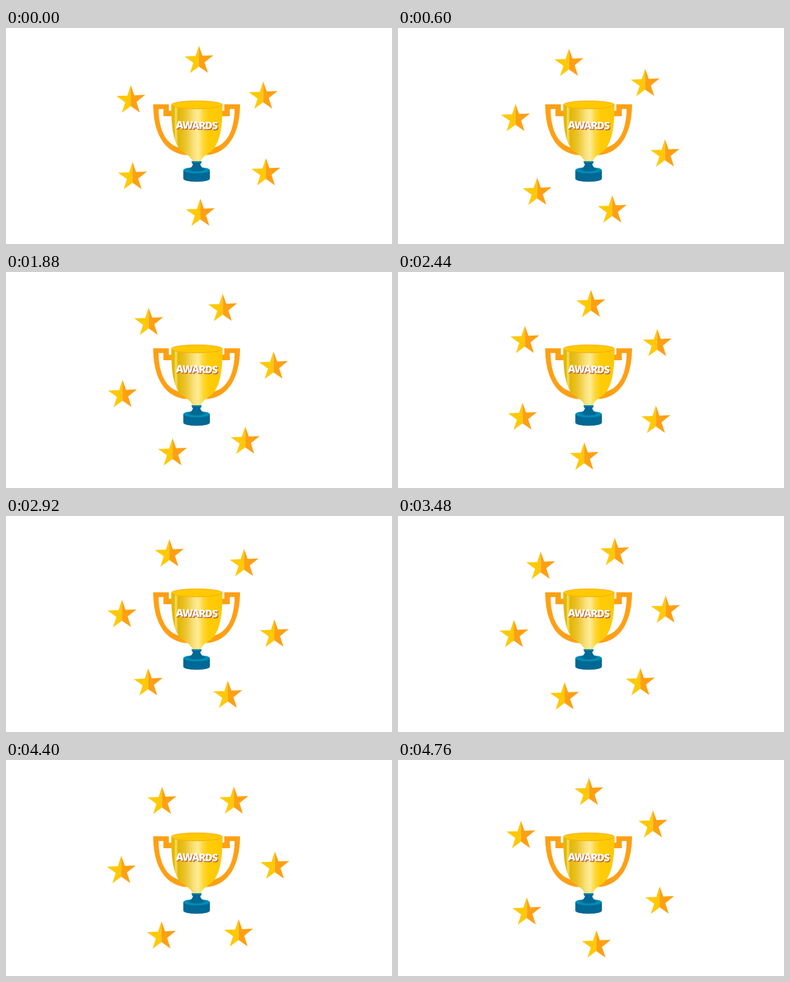
Animation of 640x360 px, one loop 4.8 s. Source, as an HTML page:

```html
<!DOCTYPE html>
<html lang="en">
<head>
<meta charset="utf-8">
<title>Awards</title>
<style>
  html, body { margin: 0; width: 100%; height: 100%; overflow: hidden; background: #fff; }
  svg { display: block; width: 100vw; height: 100vh; }
  text { font: 800 17.2px "Open Sans", sans-serif; letter-spacing: -1.2px; text-anchor: middle; }
</style>
</head>
<body>
<svg viewBox="0 0 640 360">
  <defs>
    <linearGradient id="gold">
      <stop offset="0" stop-color="#e6b800"/>
      <stop offset=".05" stop-color="#e2b504"/>
      <stop offset=".09" stop-color="#f6dc60"/>
      <stop offset=".14" stop-color="#e2b606"/>
      <stop offset=".28" stop-color="#ebc42c"/>
      <stop offset=".42" stop-color="#f8de74"/>
      <stop offset=".52" stop-color="#ffec98"/>
      <stop offset=".62" stop-color="#fdd83c"/>
      <stop offset=".72" stop-color="#ffcc08"/>
      <stop offset="1" stop-color="#fdc802"/>
    </linearGradient>
    <g id="star">
      <path fill="#ffc906" d="M0 0 -5.7 17.4-24 18-9.2 28.6-14.8 45.8 0 34.8Z"/>
      <path fill="#ffa012" d="M0 0 5.9 16.8 24 16 9.4 27.8 15 45.4 0 34.8Z"/>
    </g>
    <g id="handle">
      <path fill="#ffa014" d="M244 127H270V138H276V147H261V135H253C253 165 263 195 290 200L300 212C256 208 244 165 244 127Z"/>
      <path stroke="#ffb040" d="M244 127.5H270"/>
    </g>
  </defs>

  <use href="#handle"/>
  <use href="#handle" transform="matrix(-1 0 0 1 632 0)"/>

  <path fill="url(#gold)" d="M274 128C274 160 276 188 289 203 298 211 306 213 309 222H323C326 213 334 211 343 203 356 188 359 160 359 128Z"/>
  <ellipse cx="316.5" cy="128" rx="42.2" ry="6.6" fill="#ffca02" stroke="#fca60c"/>

  <path fill="#006894" d="M294 237V251C294 258 338 258 338 251V237Z"/>
  <ellipse cx="316" cy="237" rx="22" ry="5.2" fill="#008cb4"/>
  <path fill="#006894" d="M308 222H324V225L322 227C323 231 326 234 330 236 326 240 306 240 302 236 306 234 309 231 310 227L308 225Z"/>
  <path fill="#008cb4" d="M307 222H325L323 224H309Z"/>

  <g transform="rotate(1 316 162)">
    <text x="317.2" y="169.7" fill="#b5522c">AWARDS</text>
    <text x="315.9" y="168.2" fill="#fff">AWARDS</text>
  </g>

  <g id="ring"></g>
</svg>
<script>
  const STEP = 40, STEPS = 120, COUNT = 6;
  // the path starts and ends at the top, leaving a small gap
  const START = 0.6, END = 359.1;
  const ring = document.getElementById("ring");
  const stars = Array.from({ length: COUNT }, () => {
    const star = document.createElementNS("http://www.w3.org/2000/svg", "use");
    star.setAttribute("href", "#star");
    return ring.appendChild(star);
  });

  function draw(now) {
    const step = Math.floor(now / STEP);
    stars.forEach((star, i) => {
      // the first star runs one step ahead of the even spacing
      const lead = i * STEPS / COUNT - (i ? 1 : 0);
      const along = (step + lead) % STEPS / (STEPS - 1);
      const angle = (START + along * (END - START)) * Math.PI / 180;
      const x = 318.5 + 127.4 * Math.sin(angle);
      const y = 156.8 - 127.4 * Math.cos(angle);
      star.setAttribute("transform", `translate(${x} ${y})`);
    });
  }

  function tick() {
    draw(performance.now());
    requestAnimationFrame(tick);
  }
  tick();
</script>
</body>
</html>
```
